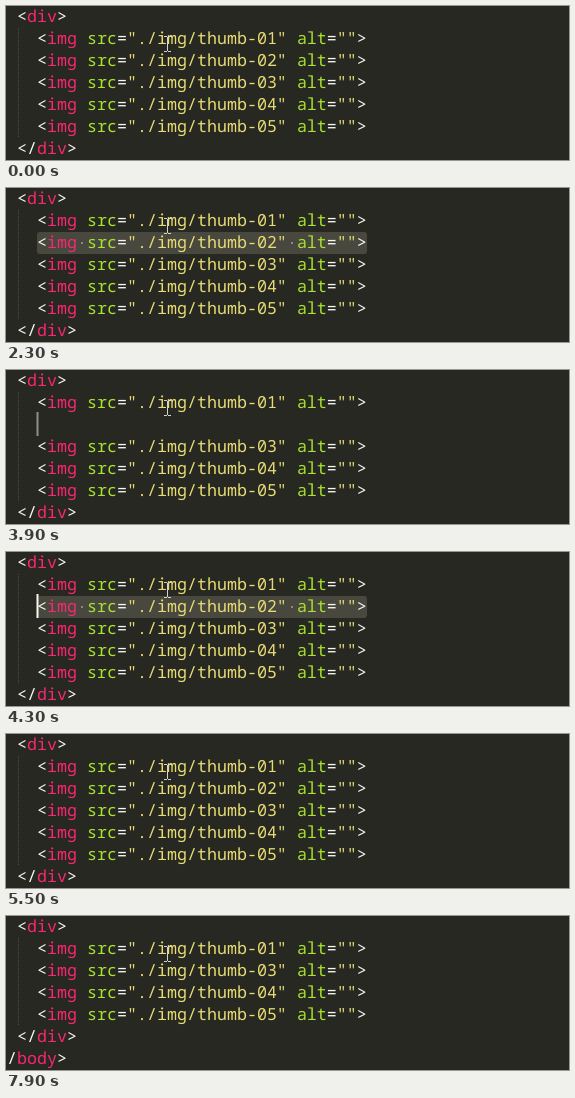
An HTML page that plays this animation: 563x154 px, repeating every 8 s.

```html
<!DOCTYPE html>
<html lang="en">
<head>
<meta charset="utf-8">
<title>Editor line selection</title>
<style>
  html, body { margin: 0; width: 100%; height: 100%; overflow: hidden; background: #272822; }
  svg { display: block; }
  text {
    font: 16.6667px "Noto Sans Mono", "DejaVu Sans Mono", monospace;
    white-space: pre;
    text-rendering: geometricPrecision;
    fill: #f8f8f2;
  }
  .tag { fill: #f92672; }
  .attr { fill: #a6e22e; }
  .str { fill: #e6db74; }
</style>
</head>
<body>
<svg width="563" height="154" viewBox="0 0 563 154">
  <rect width="563" height="154" fill="#272822"/>
  <path id="guide" stroke="#4a4a42" stroke-dasharray="1 1"/>
  <rect id="selection" y="44" height="22" rx="3" fill="#49483e"/>
  <g id="code"></g>
  <g id="dots" fill="#8b897b"></g>
  <rect id="caret" y="42" width="2" height="24" fill="#f8f8f0"/>
  <path d="M158 30.5h3m1 0h3M161.5 31v14M158 45.5h3m1 0h3" fill="none" stroke="#d4d4cf"/>
</svg>
<script>
const DURATION = 8000, CHAR = 10, LINE = 22, LEFT = 11, INDENT = 31, END = 361;
const SVG_NS = "http://www.w3.org/2000/svg";
const $ = id => document.getElementById(id);

function add(parent, name, attrs = {}, content = "") {
  const node = document.createElementNS(SVG_NS, name);
  for (const key in attrs) node.setAttribute(key, attrs[key]);
  node.textContent = content;
  return parent.appendChild(node);
}

function addLine(x, parts) {
  const line = add($("code"), "text", { x });
  for (const [content, style = ""] of parts) add(line, "tspan", { class: style }, content);
  return line;
}

const placeLine = (line, row) => line.setAttribute("y", 16 + row * LINE);
const show = (node, visible) => node.setAttribute("visibility", visible ? "visible" : "hidden");

const opening = addLine(LEFT, [["<"], ["div", "tag"], [">"]]);
const images = [1, 2, 3, 4, 5].map(n => addLine(INDENT, [
  ["<"], ["img", "tag"], [" "], ["src", "attr"], ["="], [`"./img/thumb-0${n}"`, "str"],
  [" "], ["alt", "attr"], ["="], ['""', "str"], [">"]
]));
const closing = addLine(LEFT, [["</"], ["div", "tag"], [">"]]);
const bodyEnd = addLine(LEFT - 2 * CHAR, [["</"], ["body", "tag"], [">"]]);
placeLine(opening, 0);

const dots = [1, 11, 21, 71, 281].map(x =>
  add($("dots"), "rect", { x: x + 4, y: 54, width: 2, height: 2 }));

// [start, caret x, caret opacity, selection start or null, state of the second line]
const steps = [
  [0, END, 0, null, "full"],
  [500, END, 1, null, "full"],
  [900, END, .5, null, "full"],
  [1100, END, 0, null, "full"],
  [1500, END, .9, null, "full"],
  [1700, INDENT, 1, INDENT, "full"],
  [2100, INDENT, .5, INDENT, "full"],
  [2300, INDENT, 0, INDENT, "full"],
  [2900, INDENT, 1, null, "empty"],
  [3100, INDENT, .5, null, "empty"],
  [3300, INDENT, 0, null, "empty"],
  [3900, INDENT, .5, null, "empty"],
  [4100, INDENT, 1, null, "empty"],
  [4300, INDENT, 1, INDENT, "full"],
  [4700, INDENT, .5, INDENT, "full"],
  [4900, INDENT, 0, INDENT, "full"],
  [5500, INDENT, 0, null, "full"],
  [6700, INDENT, 0, -9, "full"],
  [7900, INDENT, 0, null, "removed"]
];

function render(time) {
  const [, caretX, opacity, from, state] = steps.findLast(step => step[0] <= time);
  const removed = state === "removed";
  const selected = from !== null;
  const shift = removed ? 1 : 0;

  images.forEach((line, i) => placeLine(line, i + 1 - (i > 1 ? shift : 0)));
  show(images[1], state === "full");
  placeLine(closing, 6 - shift);
  placeLine(bodyEnd, 7 - shift);
  $("guide").setAttribute("d", `M12.5 22V${(6 - shift) * LINE}`);

  show($("selection"), selected);
  if (selected) {
    $("selection").setAttribute("x", from);
    $("selection").setAttribute("width", END - from);
  }
  dots.forEach((dot, i) => show(dot, selected && (i > 2 || from < 0)));
  $("caret").setAttribute("x", caretX - .5);
  $("caret").setAttribute("opacity", opacity);
}

const start = performance.now();
function tick() {
  render((performance.now() - start) % DURATION);
  requestAnimationFrame(tick);
}
tick();
</script>
</body>
</html>
```
